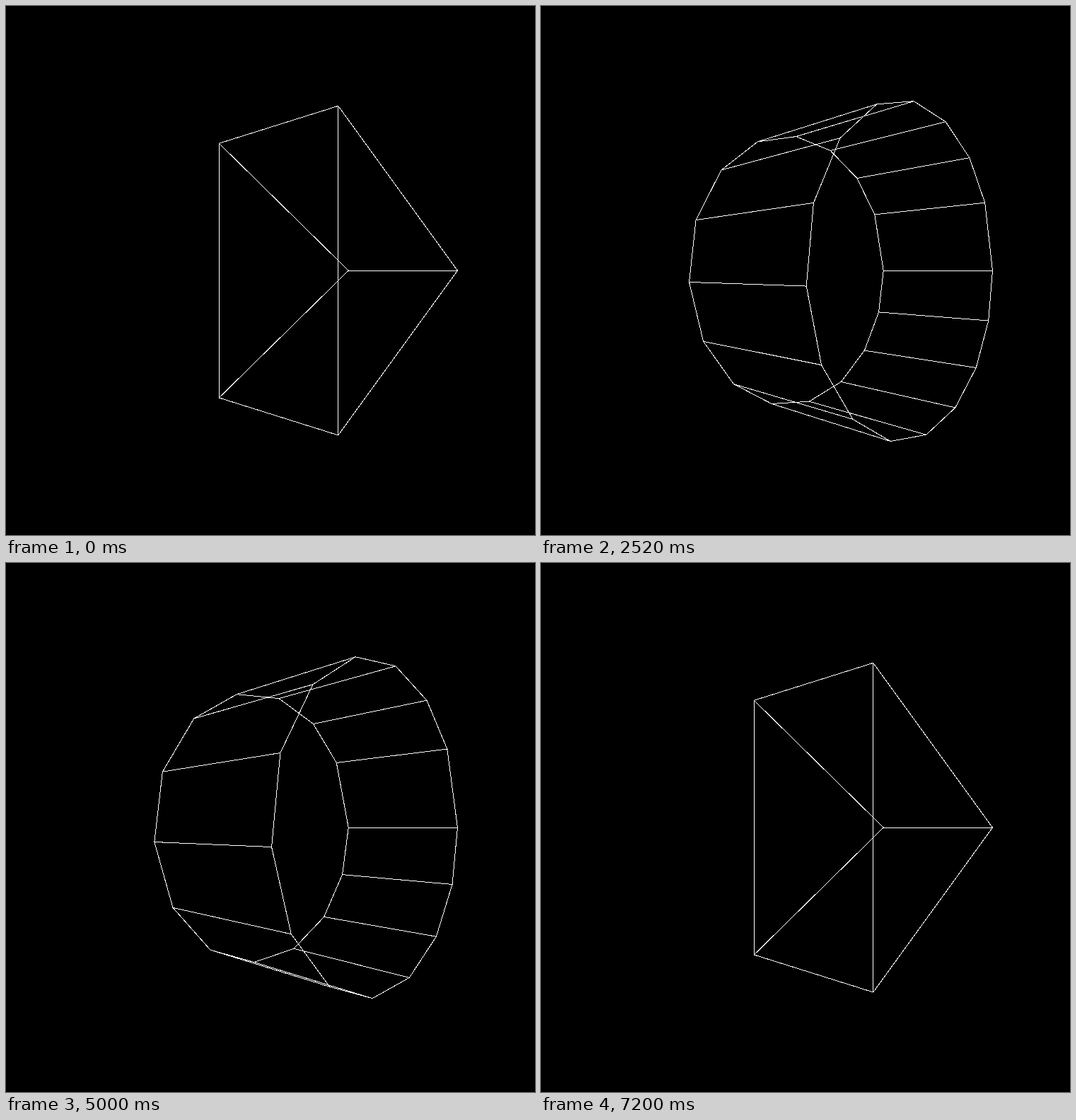
Animation of 748 by 748 pixels, one loop 7.24 s. Source, as an HTML page with a canvas:

```html
<!DOCTYPE html>
<html lang="en">
<head>
<meta charset="utf-8">
<title>Wireframe prism</title>
<style>
  html, body { margin: 0; width: 100%; height: 100%; overflow: hidden; background: #000; }
  canvas { display: block; width: 748px; height: 748px; }
</style>
</head>
<body>
<canvas id="stage" width="748" height="748"></canvas>
<script>
const SIZE = 748;
const VIEW = 746; // the scene sits inside a one pixel margin
const CENTER_X = 374.2, CENTER_Y = 373.6; // measured between pixel centres
const RADIUS = VIEW / 4;
const EYE = VIEW / 2 / Math.tan(Math.PI / 6);
const TURN = Math.SQRT1_2; // sine and cosine of the 45 degree turn
const LOOP = 7240, STEP = 200, FIRST_STEP = 40;
const MIN_SIDES = 3, MAX_SIDES = 21;

const ctx = document.getElementById("stage").getContext("2d");

// Sides go up one at a time to the maximum, then back down.
function sidesAt(ms) {
  const step = Math.floor((ms - FIRST_STEP) / STEP) + 1;
  const span = MAX_SIDES - MIN_SIDES;
  return Math.max(MIN_SIDES, MAX_SIDES - Math.abs(step - span));
}

// Perspective view of a rim point; offset runs along the prism's axis.
function project(degrees, offset) {
  const angle = degrees * Math.PI / 180;
  const across = RADIUS * Math.cos(angle);
  const x = (across + offset) * TURN;
  const y = RADIUS * Math.sin(angle);
  const scale = EYE / (EYE + (across - offset) * TURN);
  return [CENTER_X + x * scale, CENTER_Y + y * scale];
}

// Unsmoothed line, one pixel thick across its own direction.
function line(a, b) {
  const dx = b[0] - a[0], dy = b[1] - a[1];
  const flat = Math.abs(dx) >= Math.abs(dy);
  const main = flat ? 0 : 1, side = 1 - main;
  const [p, q] = a[main] < b[main] ? [a, b] : [b, a];
  const length = q[main] - p[main];
  const slope = (q[side] - p[side]) / length;
  const half = Math.hypot(dx, dy) / length / 2;
  for (let i = Math.round(p[main]); i <= Math.round(q[main]); i++) {
    const mid = p[side] + (i - p[main]) * slope;
    const from = Math.ceil(mid - half);
    const thick = Math.ceil(mid + half) - from;
    if (flat) ctx.fillRect(i, from, 1, thick);
    else ctx.fillRect(from, i, thick, 1);
  }
}

function drawPrism(sides) {
  ctx.fillStyle = "#000";
  ctx.fillRect(0, 0, SIZE, SIZE);
  ctx.fillStyle = "#fff";
  // Whole-degree steps leave a wider last side.
  const turn = Math.floor(360 / sides);
  const ring = offset => Array.from({ length: sides }, (_, i) => project(i * turn, offset));
  const near = ring(RADIUS), far = ring(0);
  for (let i = 0; i < sides; i++) {
    const next = (i + 1) % sides;
    line(near[i], near[next]);
    line(far[i], far[next]);
    line(near[i], far[i]);
  }
}

let shown = 0;
const start = performance.now();

function frame() {
  const ms = (performance.now() - start) % LOOP;
  const sides = sidesAt(ms);
  if (sides !== shown) {
    drawPrism(sides);
    shown = sides;
  }
  requestAnimationFrame(frame);
}
frame();
</script>
</body>
</html>
```
